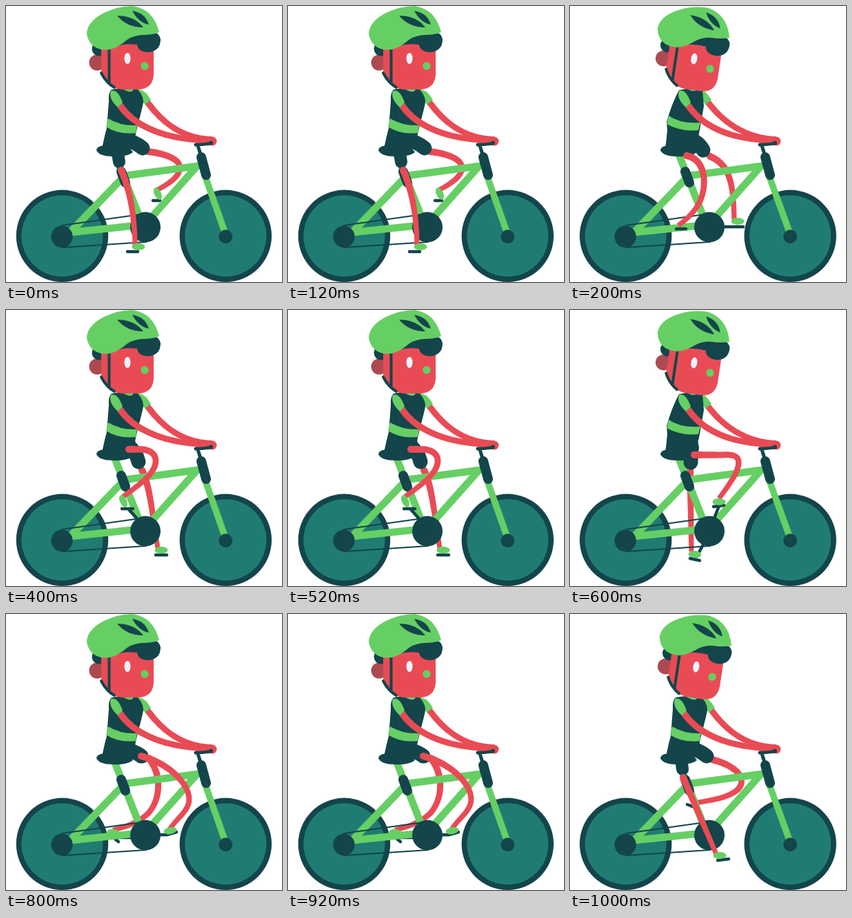
Animation of 400x400 px, one loop 1200 ms. Source, as an HTML page:

```html
<!DOCTYPE html>
<html lang="en">
<head>
<meta charset="utf-8">
<title>Cyclist</title>
<style>
  html, body { margin: 0; width: 100%; height: 100%; overflow: hidden; background: #fff; }
  svg { display: block; width: 100%; height: 100%; }
  path, line { stroke-linecap: round; stroke-linejoin: round; }
  .d { fill: #13454b; } .g { fill: #66cf64; } .r { fill: #e94b55; } .t { fill: #207c73; }
  .D, .G { fill: none; }
  .D { stroke: #13454b; } .G { stroke: #66cf64; }
</style>
</head>
<body>
<svg id="stage" viewBox="0 0 400 400"></svg>
<script>
const stage = document.getElementById('stage');
const STEP = 200;

const fill = (c, d) => `<path class="${c}" d="${d}"/>`;
const line = (c, w, d) => `<path class="${c}" stroke-width="${w}" d="${d}"/>`;
const disc = (c, x, y, r) => `<circle class="${c}" cx="${x}" cy="${y}" r="${r}"/>`;
const oval = (c, x, y, rx, ry, a = 0) =>
  `<ellipse class="${c}" rx="${rx}" ry="${ry}" transform="translate(${x} ${y}) rotate(${a})"/>`;

// Outline of a curve whose width runs from w0 to w1
function taper(c, w0, w1, d, n = 40) {
  const path = document.createElementNS('http://www.w3.org/2000/svg', 'path');
  path.setAttribute('d', d);
  const len = path.getTotalLength(), left = [], right = [];
  for (let i = 0; i <= n; i++) {
    const s = len * i / n, p = path.getPointAtLength(s);
    const a = path.getPointAtLength(Math.max(0, s - 1));
    const b = path.getPointAtLength(Math.min(len, s + 1));
    const k = (w0 + (w1 - w0) * i / n) / 2 / Math.hypot(b.x - a.x, b.y - a.y);
    const nx = (a.y - b.y) * k, ny = (b.x - a.x) * k;
    left.push(`${p.x + nx} ${p.y + ny}`);
    right.unshift(`${p.x - nx} ${p.y - ny}`);
  }
  const start = path.getPointAtLength(0);
  return fill(c, `M${left.concat(right).join('L')}Z`) + disc(c, start.x, start.y, w0 / 2);
}

// thigh: dark shorts, leg: bare part, shoe: x, y, angle, pedal: line with crank
const poses = [
  { near: { thigh: 'M160 200L164 226', leg: 'M167 238C179 265 186 300 187 347',
            shoe: [192, 349, 0], pedal: 'M176 356H191' },
    far: { thigh: 'M170 193Q186 196 198 206', leg: 'M206 211C246 216 256 229 251 240Q246 253 218 267',
           shoe: [220, 272, 65], pedal: 'M213 282H223' } },
  { near: { thigh: 'M160 198L172 203', leg: 'M169 217C197 222 199 260 188 284Q179 302 157 318',
            shoe: null, pedal: 'M154 323H168' },
    far: { thigh: 'M171 191Q187 197 193 209', leg: 'M203 218C232 230 237 258 238 312',
           shoe: [243, 312, 0], pedal: 'M205 320H251' } },
  { near: { thigh: 'M160 198L180 199', leg: 'M178 202H197C220 204 223 222 207 240Q197 251 169 271',
            shoe: [170, 277, 65], pedal: 'M168 288H184M177 288L195 308' },
    far: { thigh: 'M177 196Q189 206 192 220', leg: 'M197 232C210 258 212 300 220 345',
           shoe: [225, 348, 0], pedal: 'M217 355H233' } },
  { near: { thigh: 'M160 198L178 200', leg: 'M180 210H222C247 208 248 219 240 237Q232 252 216 273',
            shoe: [216, 278, 0], pedal: 'M208 285L223 283M216 284L205 312' },
    far: { thigh: 'M176 196L175 221', leg: 'M174 230L176 350',
           shoe: [181, 354, 5], pedal: 'M174 360L188 363M184 357L194 338' } },
  { near: { thigh: 'M165 199Q188 200 198 207', leg: 'M196 206C238 217 269 249 265 273C262 287 249 295 237 312',
            shoe: [238, 314, -10], pedal: 'M205 320H233L247 316' },
    far: { thigh: 'M170 195Q188 199 196 206', leg: 'M207 209C225 231 226 268 205 290Q187 306 155 313',
           shoe: [156, 317, 10], pedal: 'M152 321L163 330M158 324H200' } },
  { near: { thigh: 'M160 200L163 225', leg: 'M164 237L212 348',
            shoe: [217, 350, 0], pedal: 'M214 357L230 355' },
    far: { thigh: 'M170 193Q186 196 198 206', leg: 'M206 211C246 221 259 243 240 257C225 267 205 270 180 274',
           shoe: null, pedal: 'M170 276L180 280' } }
];

function limb({ leg, shoe, pedal }) {
  return taper('r', 10, 7, leg) + line('D', 4.5, pedal) +
    (shoe ? oval('g', shoe[0], shoe[1], 9.5, 5, shoe[2]) : '');
}

const wheel = x => disc('d', x, 333.3, 66.7) + disc('t', x, 333.3, 59);

function bike(odd) {
  const rear = odd ? 80.7 : 81.5, front = odd ? 319.2 : 318.3;
  return wheel(rear) + wheel(front) +
    line('G', 10.5, 'M158 216L196 312M94 327L168 250M94 328L190 318M172 246L277 232L204 314') +
    line('G', 9.5, `M288 245L${front} 331`) +
    disc('d', front, 334.3, 10) +
    disc('d', rear - .5, 334.3, 15.7) +
    line('D', 2, 'M81 318L202 301M81 350L203 342') +
    disc('d', 202, 320.5, 22) +
    line('D', 14, 'M167 240L173 256') +
    line('D', 5, 'M275 201L298 199M278 202L284 222') +
    line('D', 14, 'M283 219L290 245') +
    fill('d', 'M131 209Q132 201 150 202L178 204L184 212Q175 219 155 218Q135 218 131 209Z');
}

function torso(lean) {
  return lean
    ? fill('d', 'M158 122Q175 117 192 122L194 145L187 185Q184 194 186 203Q170 213 138 207Q140 192 141 180L140 168Q148 140 158 122Z') +
      fill('g', 'M143 159Q160 171 189 169L186 180Q162 183 140 171Z') +
      fill('g', 'M168 119Q177 119 186 120Q180 127 168 119Z')
    : fill('d', 'M153 121Q172 117 191 121Q202 133 198 145L188 185Q186 192 190 203Q170 213 139 207Q143 187 146 177L149 138Q148 126 153 121Z') +
      fill('g', 'M148 163Q166 174 190 173L188 184Q163 187 145 175Z') +
      fill('g', 'M167 119Q176 119 185 120Q183 129 167 119Z');
}

function farArm(lean) {
  const x = lean ? 199 : 204;
  return taper('r', 9, 8, `M${x} 138C${x + 18} 163 250 192 299 193`) +
    fill('g', `M${x - 13} 121Q${x - 3} 120 ${x + 6} 136L${x - 3} 143Q${x - 10} 132 ${x - 13} 121Z`);
}

function nearArm(lean) {
  const x = lean ? 172 : 166;
  return taper('r', 9.5, 8, `M${x} 145C${x + 22} 177 238 195 299 195`) +
    fill('g', `M${x - 14} 123Q${x - 4} 120 ${x + 3} 140L${x - 4} 147Q${x - 18} 134 ${x - 14} 123Z`) +
    disc('r', 299, 196, 6.5) + disc('d', 297, 198.5, 3) + line('D', 4, 'M282 201L296 199');
}

function head(shift) {
  const move = shift ? `translate(${shift} 0) rotate(8.5 169 32)` : '';
  return `<g transform="${move}">` +
    '<circle cx="132" cy="82" r="11.5" fill="#ad4a51"/>' +
    disc('d', 135, 62, 10.5) +
    fill('r', 'M138 48H214V99Q213 120 192 121H168Q150 119 138 101Z') +
    line('D', 4, 'M149.5 62V112M138 97Q145 111 157 118') +
    fill('d', 'M145 64Q165 53 190 56Q192 67 207 67Q224 65 224 48Q222 39 214 38L165 45Z') +
    fill('g', 'M117 40Q118 23 140 11Q161 0 184 0Q214 5 222 38Q213 42 196 42Q181 43 169 54Q153 66 138 63Q120 59 117 40Z') +
    fill('d', 'M161 14Q186 14 199 31Q175 31 161 14Z') +
    fill('d', 'M183 7Q202 10 207 27Q192 24 183 7Z') +
    '<ellipse cx="176" cy="76" rx="4.5" ry="8" fill="#eef3fb"/>' +
    disc('g', 201, 87, 5.7) + '</g>';
}

function draw(i) {
  const { near, far } = poses[i];
  const odd = i % 2 === 1, last = i === 5, lean = odd && !last;
  stage.innerHTML = farArm(lean) + limb(far) + bike(odd) +
    line('D', 21, far.thigh) + torso(lean) + line('D', 18, near.thigh) +
    limb(near) + nearArm(lean) + head(last ? 13.5 : odd ? 10.5 : 0);
}

let shown = -1;
function tick(now) {
  const i = Math.floor(now / STEP) % poses.length;
  if (i !== shown) draw(shown = i);
  requestAnimationFrame(tick);
}
tick(performance.now());
</script>
</body>
</html>
```
